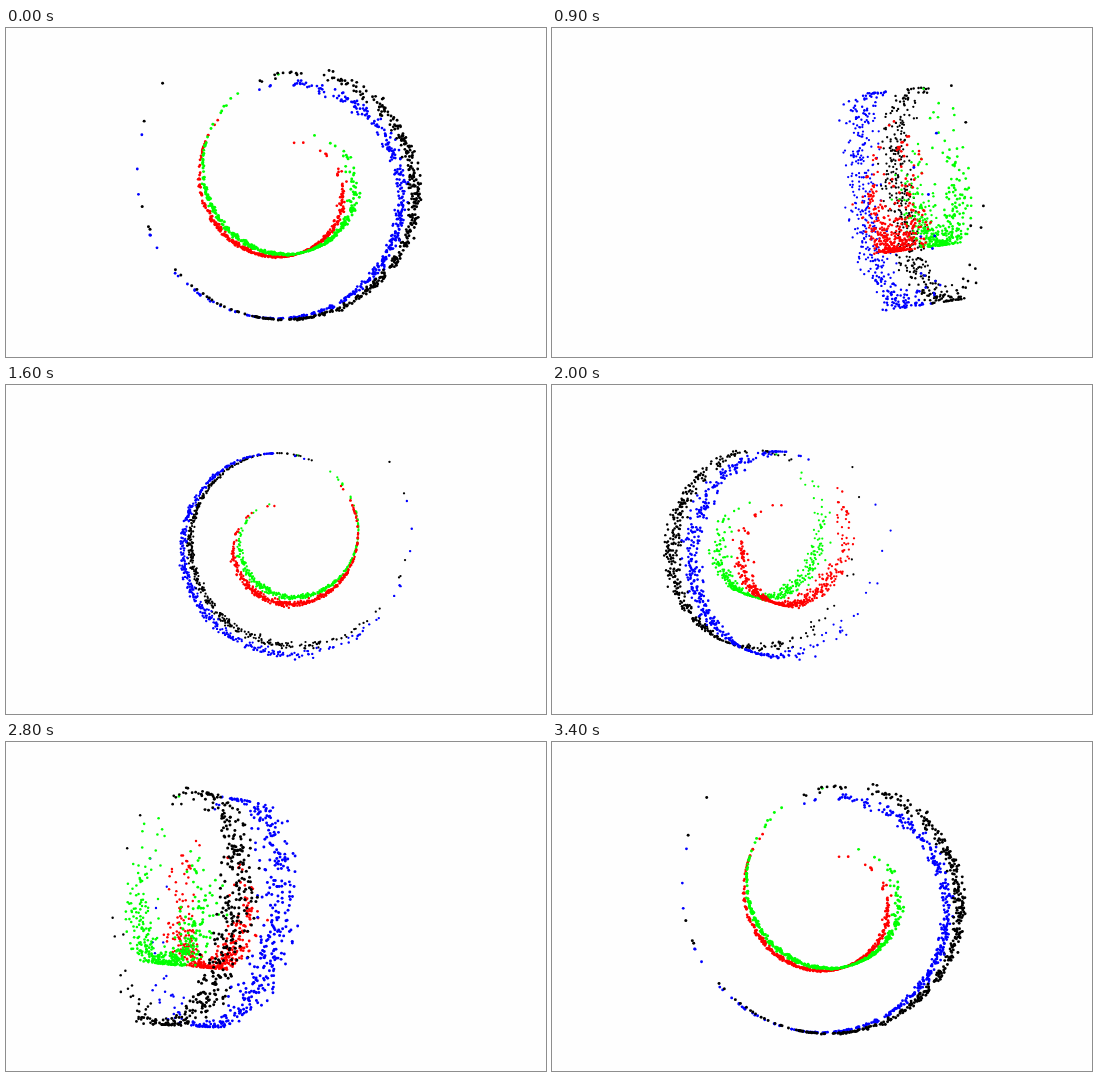
Recreate the animation shown at these times as an HTML page with a canvas. Size 540x329 px, loop 3500 ms.

```html
<!DOCTYPE html>
<html lang="en">
<head>
<meta charset="utf-8">
<title>Rotating roll</title>
<style>
  html, body { margin: 0; width: 100%; height: 100%; overflow: hidden; background: #fefefe; }
  canvas { display: block; }
</style>
</head>
<body>
<canvas id="stage" width="540" height="329"></canvas>
<script>
const ctx = document.getElementById('stage').getContext('2d');
const W = 540, H = 329;
const STEP_MS = 100, STEPS = 35;
const START = 0.122, TURN = 0.1843;   // radians, radians per step
const FOCAL = 897, DIST = 100;        // perspective
const TILT = 0.115, ROLL = 0.45;
const DOT = 0.142;                    // dot radius in world units

let seed = 20417;
function rand() {
  seed = (seed + 0x6d2b79f5) | 0;
  let r = Math.imul(seed ^ (seed >>> 15), 1 | seed);
  r = (r + Math.imul(r ^ (r >>> 7), 61 | r)) ^ r;
  return ((r ^ (r >>> 14)) >>> 0) / 4294967296;
}

function gauss(limit) {
  for (;;) {
    const g = Math.sqrt(-2 * Math.log(1 - rand())) * Math.cos(2 * Math.PI * rand());
    if (Math.abs(g) < limit) return g;
  }
}

// Roll the flat point (t, y) into a spiral and tilt its axis.
function makePoint(t, y, color) {
  const x = t * Math.cos(t + ROLL), z = t * Math.sin(t + ROLL);
  return {
    x,
    h: y * Math.cos(TILT) + z * Math.sin(TILT),
    v: z * Math.cos(TILT) - y * Math.sin(TILT),
    color
  };
}

// Each cluster: centre in the flat plane, plus a few stray points.
const clusters = [
  { color: '#ff0000', t: 7.5, y: 7.5, strays: [[4.46, 7.3], [4.65, 7.8]] },
  { color: '#00ff00', t: 7.5, y: 12.5, strays: [[4.71, 12.4], [10.4, 12.6]] },
  { color: '#0000ff', t: 12.5, y: 7.5, strays: [[15.37, 6.1], [15.57, 8.9], [15.19, 7.3]] },
  { color: '#000000', t: 12.5, y: 12.5, strays: [[15.89, 11.7], [15.62, 12.1], [15.07, 12.9]] }
];

const points = [];
for (const c of clusters) {
  for (let i = 0; i < 397; i++) {
    points.push(makePoint(c.t + gauss(2.55), c.y + gauss(2.9), c.color));
  }
  for (const [t, y] of c.strays) points.push(makePoint(t, y, c.color));
}

function draw(step) {
  const a = START + TURN * step;
  const yaw = a + 0.03 * Math.cos(a);
  const cos = Math.cos(yaw), sin = Math.sin(yaw);

  for (const p of points) {
    p.depth = p.h * cos - p.x * sin;
    p.scale = FOCAL / (DIST - p.depth);
    p.sx = W / 2 + (p.x * cos + p.h * sin) * p.scale;
    p.sy = H / 2 + p.v * p.scale;
  }
  points.sort((p, q) => p.depth - q.depth);

  ctx.fillStyle = '#fefefe';
  ctx.fillRect(0, 0, W, H);
  for (const p of points) {
    ctx.fillStyle = p.color;
    ctx.beginPath();
    ctx.arc(p.sx, p.sy, DOT * p.scale, 0, 2 * Math.PI);
    ctx.fill();
  }
}

let shown = -1;
const begin = performance.now();
function tick() {
  const step = Math.floor((performance.now() - begin) / STEP_MS) % STEPS;
  if (step !== shown) {
    shown = step;
    draw(step);
  }
  requestAnimationFrame(tick);
}
tick();
</script>
</body>
</html>
```
